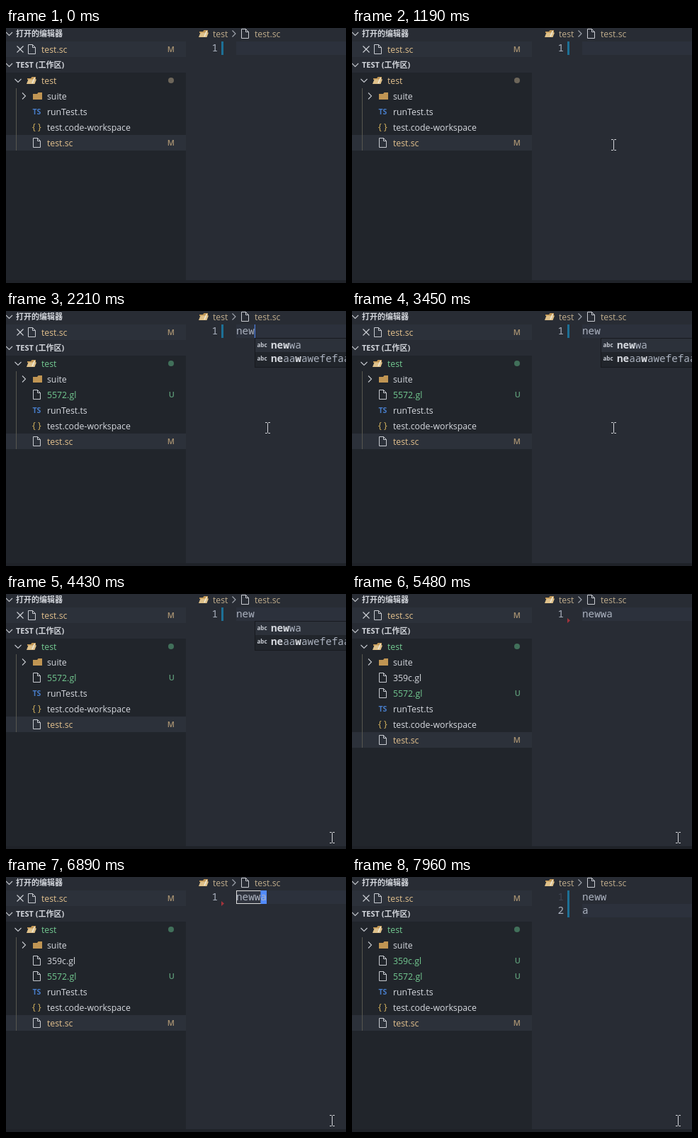
Animation of 480 by 360 pixels, one loop 8000 ms. Source, as an HTML page:

```html
<!DOCTYPE html>
<html lang="zh">
<head>
<meta charset="utf-8">
<title>Editor</title>
<style>
html, body { margin: 0; width: 100%; height: 100%; overflow: hidden; background: #282c34; }
svg { display: block; width: 480px; height: 360px; }
text { white-space: pre; }
.ui { font: 12.3px "Open Sans", "Noto Sans", sans-serif; }
.head { font: bold 11px "Open Sans", "Noto Sans CJK SC", "Noto Sans CJK", sans-serif; fill: #d2d5db; }
.badge { font: 600 11px "Open Sans", sans-serif; text-anchor: end; }
.ts { font: bold 10.5px "Open Sans", sans-serif; fill: #477cc8; }
.json { font: 12.5px "Open Sans", sans-serif; fill: #d9b65f; }
.code { font: 14.3px "Noto Sans Mono", "DejaVu Sans Mono", monospace; fill: #abb2bf; }
.hit { font-weight: bold; fill: #d7dae0; }
.abc { font: bold 8px "Open Sans", sans-serif; fill: #c5c9d1; }
</style>
</head>
<body>
<svg id="stage" viewBox="0 0 480 360"></svg>
<script>
const LOOP = 8000, LEFT = 325, CHAR = 8.6, LINE = 19;
const GOLD = '#e2c08d', GREEN = '#73c991', PLAIN = '#d7dae0', DIM_GOLD = '#a99372', DIM_GREEN = '#5d9a77';
const stage = document.getElementById('stage');

const between = (t, a, b) => t >= a && t < b;
const col = n => LEFT + CHAR * n;
const rect = (x, y, w, h, fill, extra = '') =>
  `<rect x="${x}" y="${y}" width="${w}" height="${h}" fill="${fill}" ${extra}/>`;
const text = (x, y, cls, s, fill) =>
  `<text x="${x}" y="${y}" class="${cls}"${fill ? ` style="fill:${fill}"` : ''}>${s}</text>`;
const line = (d, color, width = 1) =>
  `<path d="${d}" fill="none" stroke="${color}" stroke-width="${width}"/>`;
const shape = (d, fill) => `<path d="${d}" fill="${fill}"/>`;

// Follows moves of the form [start, value, duration].
function follow(t, value, moves) {
  for (const [start, to, span] of moves) {
    if (t < start) break;
    value += (to - value) * Math.min(1, (t - start) / span);
  }
  return value;
}

const down = (x, y) => line(`M${x - 4.5} ${y - 2}l4.5 4.5l4.5 -4.5`, '#c5c8ce', 1.1);
const right = (x, y, color = '#c5c8ce') => line(`M${x - 2} ${y - 4.5}l4.5 4.5l-4.5 4.5`, color, 1.1);
const fileIcon = (x, y) =>
  line(`M${x + .5} ${y - 6.5}h6l4 4v9h-10zM${x + 6.5} ${y - 6.5}v4h4`, '#c8cbd1');
const folderIcon = (x, y) => shape(`M${x} ${y - 3}h6l1.5 -2h5.5v10h-13z`, '#c09553');
const openFolder = (x, y) =>
  shape(`M${x + 1} ${y - 3}h5l1.5 -2h5.5v4h-12z`, '#c09553') +
  shape(`M${x + 2.5} ${y - 1.5}h11.5l-2.5 6.5h-11.5z`, '#dfc18a') +
  line(`M${x + 11.5} ${y - 4}l-3.5 8`, '#f0ead9', 1.6);

const ROW_ICONS = {
  folder: y => right(25, y) + folderIcon(38, y),
  file: y => fileIcon(38, y),
  ts: y => text(37.5, y + 4, 'ts', 'TS'),
  json: y => text(37, y + 4, 'json', '{ }')
};

function treeRow(y, icon, name, color = PLAIN, mark = '') {
  const badge = mark === 'M' ? DIM_GOLD : DIM_GREEN;
  return ROW_ICONS[icon](y) + text(58, y + 4.5, 'ui', name, color) +
    text(238, y + 4.2, 'badge', mark, badge);
}

function sidebar(t) {
  const rows = [['folder', 'suite']];
  const fresh = (name, shown, tracked) => {
    if (t >= shown) rows.push(['file', name, t >= tracked ? GREEN : PLAIN, t >= tracked ? 'U' : '']);
  };
  fresh('359c.gl', 5080, 7540);
  fresh('5572.gl', 1960, 2210);
  rows.push(['ts', 'runTest.ts'], ['json', 'test.code-workspace'], ['file', 'test.sc', GOLD, 'M']);
  const last = 74 + 22 * rows.length;
  const green = t >= 2210;
  return rect(0, 0, 254, 360, '#21252b') +
    rect(0, 0, 254, 19, '#282c34') + rect(0, 19, 254, 22, '#2c313a') +
    rect(0, 41, 254, 22, '#282c34') + rect(0, last - 11, 254, 22, '#2c313a') +
    rect(14, 85, 1, last - 74, '#57574f') +
    down(4.5, 8) + text(14, 12, 'head', '打开的编辑器') +
    line('M15.5 25.5l9 9M24.5 25.5l-9 9', '#d0d3d9', 1.1) + fileIcon(31, 30) +
    text(50, 34.5, 'ui', 'test.sc', GOLD) + text(238, 34.2, 'badge', 'M', DIM_GOLD) +
    down(4.5, 52) + text(14, 56, 'head', 'TEST (工作区)') +
    down(17, 74) + openFolder(29, 74) +
    text(50, 78.5, 'ui', 'test', green ? GREEN : GOLD) +
    `<circle cx="233" cy="74" r="4" fill="${green ? '#41705a' : '#6d665a'}"/>` +
    rows.map((row, i) => treeRow(96 + 22 * i, ...row)).join('');
}

function typed(t) {
  if (t < 1600) return '';
  if (t < 1760) return 'n';
  if (t < 1900) return 'ne';
  if (t < 4760) return 'new';
  return t < 7380 ? 'newwa' : 'neww';
}

function caret(t) {
  const x = follow(t, LEFT, [
    [1600, col(1), 80], [1760, col(2), 80], [1900, col(3), 80],
    [4760, col(5), 80], [4920, col(4), 60], [5040, LEFT, 80],
    [6210, col(1), 80], [6350, col(2), 80], [6510, col(3), 80],
    [6750, col(4), 140], [7380, LEFT, 120]
  ]);
  const y = follow(t, 19, [[7380, 38, 120]]);
  const hidden = [[0, 680], [1190, 1600], [2460, 2890], [3450, 3940], [4430, 4760], [5480, 5900], [7960, LOOP]]
    .some(([a, b]) => between(t, a, b));
  const width = t < 4920 ? 1 : CHAR;
  let out = '';
  if (between(t, 6210, 7380)) {
    out += rect(LEFT + .5, 19.5, x + width - LEFT - 1, 18, '#30343e', 'stroke="#dddddd"');
  }
  return hidden ? out : out + rect(x.toFixed(2), y.toFixed(2), width, LINE, '#528bff');
}

function highlight(word, query) {
  let next = 0;
  return [...word].map(c => c === query[next] ? (next++, `<tspan class="hit">${c}</tspan>`) : c).join('');
}

function popup(t) {
  if (!between(t, 1680, 4760)) return '';
  const query = typed(t), x = Math.round(col(query.length));
  const words = ['neaawawefefaaewf', 'newwa'];
  if (query.length > 2) words.reverse();
  return rect(x + .5, 38.5, 200, 41, '#21252b', 'stroke="#181a1f"') +
    rect(x + 1, 39, 200, LINE, '#2c313a') +
    words.map((word, i) => {
      const y = 52.5 + LINE * i;
      return text(x + 3.5, y - 1.5, 'abc', 'abc') + text(x + 23, y, 'code', highlight(word, query));
    }).join('');
}

function editor(t) {
  const split = t >= 7380;
  const blue = '#1d7096';
  let gutter = rect(304, 19, 3, LINE, blue);
  if (between(t, 5060, 7480)) gutter = shape('M304 34l4 3.5l-4 3.5z', '#a1333b');
  else if (split) gutter = rect(304, 19, 3, 2 * LINE, blue);
  return rect(254, 0, 226, 360, '#282c34') +
    openFolder(272, 8) + text(292, 12.5, 'ui', 'test', '#c0ad8c') + right(321.5, 8, '#a3a8b1') +
    fileIcon(332, 8) + text(351, 12.5, 'ui', 'test.sc', '#c0ad8c') +
    rect(LEFT, split ? 38 : 19, 155, LINE, '#2c313c') +
    text(290.5, 33, 'code', '1', split ? '#404654' : '#abb2bf') +
    (split ? text(290.5, 52, 'code', '2') + '' : '') +
    gutter + caret(t) +
    text(LEFT, 33, 'code', typed(t)) +
    (split ? text(LEFT, 52, 'code', 'a') : '') +
    popup(t);
}

function pointer(t) {
  if (t < 30) return '';
  const out = u => 1 - (1 - u) ** 2, inOut = u => u * u * (3 - 2 * u);
  const clamp = u => Math.max(0, Math.min(1, u));
  const a = out(clamp((t - 30) / 160)), b = inOut(clamp((t - 3450) / 660));
  let x = 454.5 - 85 * a + 88 * b, y = 347 - 182 * a + 179 * b;
  if (between(t, 610, 680)) { x += 6; y += 3; }
  if (t >= 4270) x += 3;
  return `<g transform="translate(${Math.round(x - .5) + .5} ${Math.round(y)})">` +
    line('M-3.5 -7.5h2.5l1 1l1 -1h2.5M0 -6.5v13M-3.5 7.5h2.5l1 -1l1 1h2.5', '#d4d6da') + '</g>';
}

let shown = '';
function render(t) {
  const picture = editor(t) + sidebar(t) + rect(0, 356, 480, 4, '#1f2228') + pointer(t);
  if (picture !== shown) stage.innerHTML = shown = picture;
}

const begin = performance.now();
function tick() {
  render((performance.now() - begin) % LOOP);
  requestAnimationFrame(tick);
}
tick();
</script>
</body>
</html>
```
